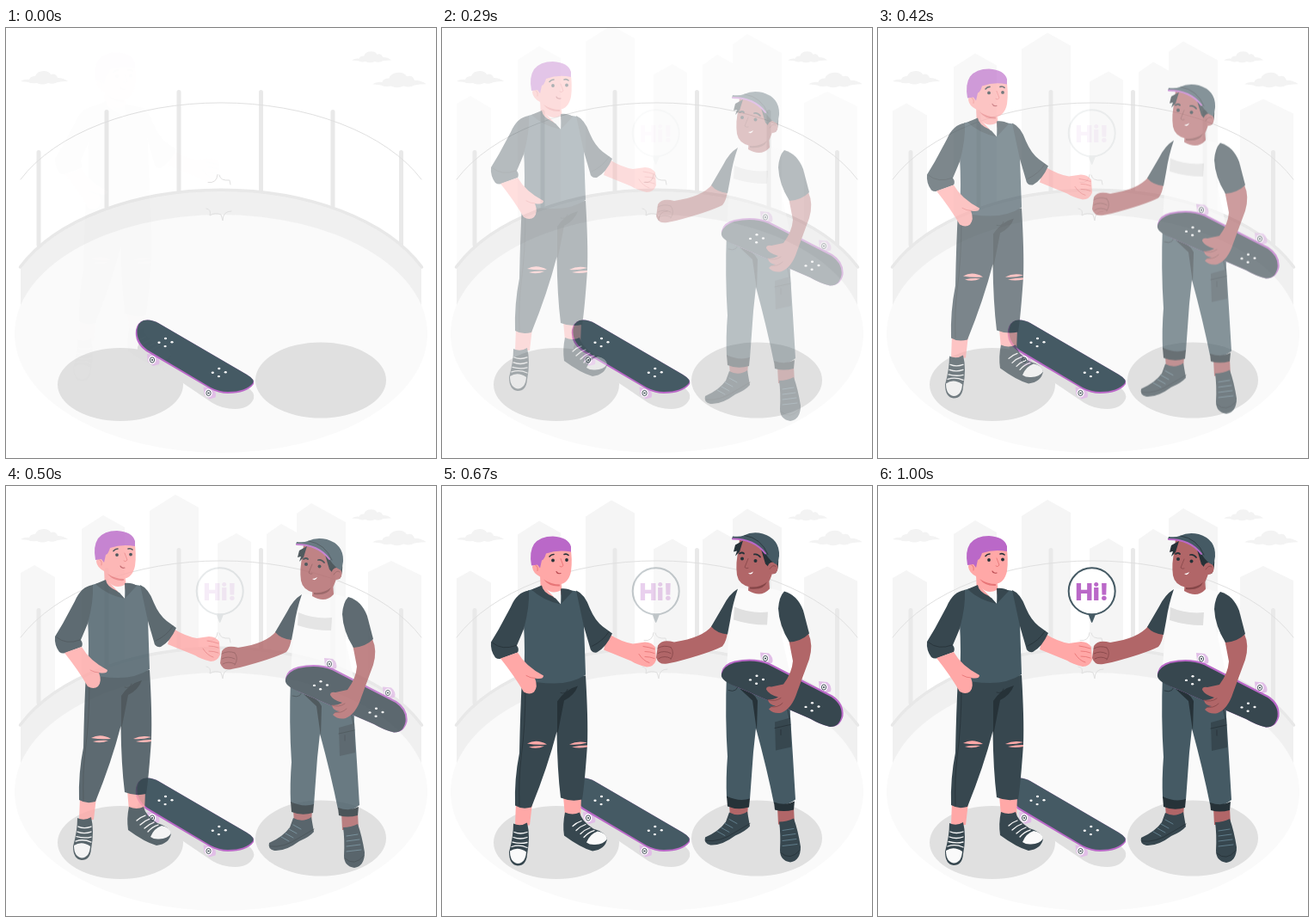
Animation of 500x500 px, one loop 1040 ms. Source, as an HTML page:

```html
<!DOCTYPE html>
<html lang="en">
<head>
<meta charset="utf-8">
<title>Fist bump at the skate park</title>
<style>
  html, body { margin: 0; width: 100%; height: 100%; overflow: hidden; background: #fff; }
  svg { display: block; width: 100%; height: 100%; }
  .slate { fill: #455a64; }
  .dark { fill: #37474f; }
  .ink { fill: #263238; }
  .pink { fill: #ffa8a7; }
  .brown { fill: #b16668; }
  .purple { fill: #ba68c8; }
  .white { fill: #fafafa; }
  .shade { fill: #e0e0e0; }
  .line { fill: none; stroke-linecap: round; stroke-linejoin: round; }
  .seam { stroke: #263238; stroke-width: .8; }
  .lace { stroke: #fafafa; stroke-width: 1.3; }
  .blush { stroke: #e87577; stroke-width: .9; }
  .crease { stroke: #854648; stroke-width: .8; }
</style>
</head>
<body>
<svg viewBox="0 0 500 500">
  <defs>
    <path id="cloud" fill="#f3f3f3" d="M0 13Q5 10 10 11Q11 7 17 7Q19 1 27 1Q33 1 35 5Q41 3 43 9Q50 9 55 13Q48 13 43 14Q38 17 32 15Q25 18 19 15Q12 16 9 14Z"/>
    <g id="wheel">
      <path fill="#e1bee7" d="M-6-7L4-6Q10-1 8 5L1 7L-5 2Z"/>
      <ellipse rx="4.4" ry="5" fill="#faf4fb"/>
      <ellipse rx="2.6" ry="3.1" fill="#fff" stroke="#37474f" stroke-width=".9"/>
      <circle r="1.1" class="dark"/>
    </g>
    <g id="bolts" class="white">
      <ellipse cx="-7.5" cy=".4" rx="1.6" ry="1.2"/><ellipse cy="-4.3" rx="1.6" ry="1.2"/>
      <ellipse cx="7.5" rx="1.6" ry="1.2"/><ellipse cx="-.4" cy="4.8" rx="1.6" ry="1.2"/>
    </g>
  </defs>

  <g id="city" fill="#f5f5f5">
    <path d="M17 107L33 98L57 112V300H17ZM88 56L113 40L138 54V260H88ZM167 35L197 16L224 31V240H167ZM246 73L268 61L285 71V240H246ZM303 62L320 50L338 60V240H303ZM338 38L355 26L395 48V260H338ZM421 106L448 93L483 110V300H421Z"/>
  </g>

  <use href="#cloud" x="17" y="49"/>
  <use href="#cloud" transform="translate(402 26.5) scale(.84)"/>
  <use href="#cloud" transform="translate(426 50.5) scale(1.14)"/>

  <path class="line" stroke="#e9e9e9" stroke-width="5" d="M38 144.500V252M117 97.500V208M201 74.500V190M296.500 74.500V190M380 97.500V208M459.500 144.500V252"/>
  <path class="line" stroke="#e0e0e0" d="M17 176A255 150 0 0 1 483 176"/>
  <path fill="#f0f0f0" d="M17 278A255 152 0 0 1 483 278V340H17Z"/>
  <path class="line" stroke="#e8e8e8" stroke-width="3.500" d="M16.500 278A255 150 0 0 1 483.500 278"/>
  <ellipse cx="250" cy="355.500" rx="240" ry="138.500" class="white"/>

  <g class="shade">
    <ellipse cx="133" cy="414.500" rx="73" ry="42.500"/>
    <ellipse cx="366" cy="409.500" rx="76" ry="44"/>
    <path d="M153 371Q157 358 178 363L279 417Q290 423 288 431Q283 443 266 443Q252 443 240 436L160 382Q152 376 153 371Z"/>
  </g>
  <path class="line" stroke="#e0e0e0" d="M235 179.500Q245 181 246 170.500M248 171Q249 178 260 177L261 182M233 210Q239 211 237 218Q243 214 250 217L252 224Q252 213 262 213"/>

  <g id="groundBoard">
    <use href="#wheel" x="170" y="386"/>
    <use href="#wheel" x="235.500" y="424.500"/>
    <path class="purple" d="M160 340Q168 338 177 343L280 403Q290 409 288 414Q280 425 258 425Q248 425 238 420L163 376Q149 366 151 351Q153 342 160 340Z"/>
    <path class="slate" d="M160 340Q168 338 177 343L280 403Q290 409 287 413Q279 423 258 423Q248 423 238 418L164 374Q151 364 152.500 350Q154 342 160 340Z"/>
    <use href="#bolts" x="185.500" y="365.300"/>
    <use href="#bolts" x="247.800" y="400.300"/>
  </g>

  <g id="left">
    <path class="pink" d="M86 368H105L102 394H85ZM141 360H162L161 386L143 383Z"/>
    <path class="dark" d="M83 392Q91 396 99 391Q103 407 99 428Q98 441 88 441Q78 440 78 425Q83 407 83 392Z"/>
    <path class="white" d="M79 424Q88 418 98 425Q97 438 88 438.500Q79 437 79 424Z"/>
    <path class="line lace" d="M84 402Q91 405 99 402M83 408Q91 411 99 408M82 413.500Q91 416 99 414M81 419Q90 416 99 420"/>
    <path class="dark" d="M143 379Q152 383 160 379Q162 389 176 398Q190 402 192 410Q190 422 175 424Q161 420 142 406Q140 393 143 379Z"/>
    <path class="white" d="M168 414Q172 404 181 401Q191 403 192 410Q188 416 178 416.500Q172 417 168 414Z"/>
    <path class="line lace" d="M152 395Q156 391 162 389M156 400Q161 395 167 393M161 404Q166 399 172 397M165 408Q170 402 177 400"/>

    <path class="dark" d="M93 224L167 220Q170 270 169 300Q166 345 163 364Q150 367 138 362Q134 330 133.500 285Q123 326 104 373Q93 376 85 371Q84 340 90 310Q91 260 93 224Z"/>
    <path class="ink" d="M158 232Q154 243 142 249L134 290L134 250Q143 236 158 232Z"/>
    <path class="line seam" d="M97 232Q97 280 92 315Q89 340 90 371M138 240Q144 242 146 236"/>
    <path class="pink" d="M99 299Q110 293 122 300Q110 301 99 299ZM101 303Q111 301 119 302Q110 306 101 303ZM148 300Q158 295 169 298Q158 301 148 300ZM151 303Q160 301 169 301V303Q159 305 151 303Z"/>

    <path class="pink" d="M193 171Q209 181 222 183L236 181Q244 181 248 187L249 202Q246 210 238 210Q226 207 220 203L188 190Z"/>
    <path class="line blush" d="M234 186Q241 187 247 189M236 192Q242 192 247 194M236 198Q242 198 247 200M229 195Q234 203 241 205"/>
    <path class="pink" d="M114 104L138 106L140 124L132 134L115 121Z"/>
    <path class="white" d="M121 119Q128 126 138 121V137Z"/>
    <path class="slate" d="M100 121L115 117Q119 127 132 130L138 137L139 119L157 122Q163 132 165 160L167 219Q152 229 130 229Q110 229 95 224Q97 193 95 160Z"/>
    <path class="dark" d="M104 120L116 115Q117 123 129 128L138 137Q118 133 104 120ZM138 119Q146 118 152 122L139 136Z"/>
    <path class="dark" d="M101 121Q87 123 80 140L66 166L57 181Q56 191 62 199Q66 202 72 199L88 193Q90 189 87 185L95 166Q102 140 101 121ZM156 121Q166 125 172 142Q178 156 187 163L198 171Q191 187 180 193Q173 194 172 187L165 163Z"/>
    <path class="line seam" d="M59 182Q70 191 86 185M174 186Q187 180 194 169"/>
    <path class="pink" d="M68 200L88 193Q97 209 118 220Q118 225 108 223Q112 233 107 239Q102 243 95 239Q84 220 68 200Z"/>
    <path class="line blush" d="M98 220Q103 223 108 223"/>

    <path class="pink" d="M115 73L149 69Q152 84 150 99Q147 113 136 114Q121 114 114 105Q106 101 105 94Q106 86 113 89Z"/>
    <path fill="#e87577" d="M118 108Q127 114 137 114V116Q125 117 118 108Z"/>
    <path class="purple" d="M104 92Q101 76 107 67Q114 58 129 58Q147 59 150 70V76Q135 73 121 78Q119 85 116 86L114 95L111 91Z"/>
    <circle cx="129" cy="86" r="1.900" class="ink"/><circle cx="145" cy="85.500" r="1.900" class="ink"/>
    <path class="line" stroke="#263238" stroke-width="1.600" d="M125 81.500Q127 79 130 79M142 79Q145 78 147 80"/>
    <path class="line blush" d="M138 84L141 92Q139 95 137 93M109 92Q112 93 111 98"/>
    <path class="line" stroke="#b94b52" stroke-width="1.200" d="M133 99Q134 102 138 101"/>
  </g>

  <g id="right">
    <path class="brown" d="M334 370H356L355 386H335ZM390 374H409L410 394H391Z"/>
    <path class="dark" d="M334 380Q345 386 355 379L358 396Q353 402 341 407Q325 419 312 418Q304 416 306 409Q322 402 330 391ZM392 391Q401 391 409 387Q414 401 417 420Q417 436 405 438Q393 436 393 424Q394 405 392 391Z"/>
    <path class="line" stroke="#607d8b" d="M329 393L338 398M325 398L334 403M320 402L329 407M334 388L343 393M396 401L409 399M396 407L411 405M396 413L412 411M396 419L413 417"/>
    <path class="line seam" d="M307 413Q323 415 341 403L358 393M394 427Q405 437 416 424"/>

    <path class="slate" d="M331 218H407Q404 240 405 268L408 315L411 365Q400 374 386 370Q378 330 365 282L362 310L358 365Q344 370 331 363Q330 340 332 315Q329 270 331 218Z"/>
    <path class="ink" d="M331 361Q345 368 358 364L357 374Q344 378 332 373ZM386 368Q399 373 410 367L409 377Q397 380 387 377ZM346 236Q362 239 367 250L366 285L361 250Z"/>
    <path class="dark" d="M387 275L405 270L406 304L388 308Z"/>
    <path class="line seam" d="M387 282L405 278M394 284V290M333 238Q344 242 345 229M399 245L404 271"/>

    <path class="brown" d="M314 163Q303 177 270 182Q256 178 251 186L249 200Q252 209 262 207L272 205Q310 195 326 187Q331 181 332 170Z"/>
    <path class="line crease" d="M251 189Q258 185 266 188M251 195Q258 191 266 195M252 201Q259 197 266 201M266 188Q271 194 266 202"/>
    <path class="white" d="M343 119L357 120Q368 126 380 119L399 124Q389 151 395 175L406 225H330Q332 197 334 165Z"/>
    <path class="brown" d="M357 110L380 106L381 120Q371 131 356 122Z"/>
    <path class="shade" d="M340 141Q358 149 379 147L378 162Q357 162 339 156Z"/>
    <path class="dark" d="M344 120Q334 126 327 140L313 164Q320 172 332 173L335 157Q338 137 344 120Z"/>

    <use href="#wheel" x="376" y="201"/>
    <use href="#wheel" x="444" y="234.500"/>
    <path class="purple" d="M325 217Q327 207 340 204Q362 199 380 206L454 244Q468 253 466.500 268Q463 281 451 280.500Q440 278 428 271L345 235Q323 226 325 217Z"/>
    <path class="dark" d="M325 219Q327 210 340 206Q362 201 379 208L453 246Q466 255 464.500 268Q462 281 451 280.500Q440 278 428 271L345 235Q323 227 325 219Z"/>
    <use href="#bolts" x="366" y="225.500"/>
    <use href="#bolts" x="430.500" y="257"/>

    <path class="brown" d="M403 178L426 172Q432 185 427 202L413 240Q407 259 395 264Q386 266 380 260Q382 257 388 256Q380 255 379 249Q386 249 391 246Q380 243 377 237Q377 233 383 234L397 231Q407 218 408 204Z"/>
    <path class="line crease" d="M379 249Q387 252 394 247M382 257Q390 259 396 253"/>
    <path class="dark" d="M398 123Q413 127 420 145L427 172Q418 181 404 182Q392 163 391 143Q392 129 398 123Z"/>

    <path class="brown" d="M346 61H366L378 78L385 98Q382 112 376 116Q368 120 358 118Q345 115 343 104Q341 90 345 74Z"/>
    <path fill="#854648" d="M358 118Q370 119 378 112Q374 122 358 120Z"/>
    <path class="ink" d="M341 69L350 64L346 77L341 82L343 76L339 77ZM371 74L391 82Q392 96 388 102Q381 101 379 94L376 91Z"/>
    <ellipse cx="384.500" cy="96" rx="6" ry="7" class="brown"/>
    <path class="line crease" d="M381 97Q385 91 388 94"/>
    <path class="slate" d="M338 59Q346 60 351 58Q361 53 373 56Q393 62 392 82L390 92Q383 90 376 79Q363 62 337 62Z"/>
    <path class="line" stroke="#ba68c8" stroke-width="2" d="M338 62Q363 62 376 79"/>
    <path class="line seam" d="M352 58Q371 61 379 80"/>
    <circle cx="349" cy="85" r="2" class="ink"/><circle cx="364.500" cy="87.500" r="2" class="ink"/>
    <path class="line" stroke="#263238" stroke-width="1.800" d="M346 79Q349 77 351 79M363 80Q367 79 370 83"/>
    <path class="line crease" d="M356 85L352 95Q354 97 356 96"/>
    <path fill="#fff" d="M356 102Q359 102 362 100Q360 105 356 102Z"/>
  </g>

  <g id="bubble">
    <path class="slate" d="M244 148H253.500L249.500 158Q248.700 160 247.900 158Z"/>
    <circle cx="248.700" cy="122.300" r="27" fill="#fff" stroke="#455a64" stroke-width="2"/>
    <text x="248.700" y="133" class="purple" text-anchor="middle" font-family="Inter, Roboto, sans-serif" font-weight="900" font-size="27">Hi!</text>
  </g>
</svg>
<script>
const LOOP = 1040, DURATION = 1000, DROP = 30, LEAD = 30;
const [city, left, right, bubble] = ['city', 'left', 'right', 'bubble'].map(id => document.getElementById(id));

const bezier = (a, b, s) => 3 * (1 - s) ** 2 * s * a + 3 * (1 - s) * s * s * b + s ** 3;

// cubic-bezier(.36, -.01, .5, 1.38): settles after a small overshoot
function ease(x) {
  let lo = 0, hi = 1;
  for (let i = 0; i < 24; i++) {
    const mid = (lo + hi) / 2;
    if (bezier(.36, .5, mid) < x) lo = mid; else hi = mid;
  }
  return bezier(-.01, 1.38, hi);
}

function slide(el, from, p) {
  el.setAttribute('transform', `translate(0 ${from * (1 - p)})`);
  el.setAttribute('opacity', Math.min(1, Math.max(0, p)));
}

function draw() {
  const time = performance.now() % LOOP;
  const p = ease(Math.min(1, (time + LEAD) / DURATION));
  slide(city, -DROP, p);
  slide(left, -DROP, p);
  slide(right, DROP, p);
  bubble.setAttribute('opacity', Math.min(1, time / DURATION) ** 3);
  requestAnimationFrame(draw);
}
draw();
</script>
</body>
</html>
```
